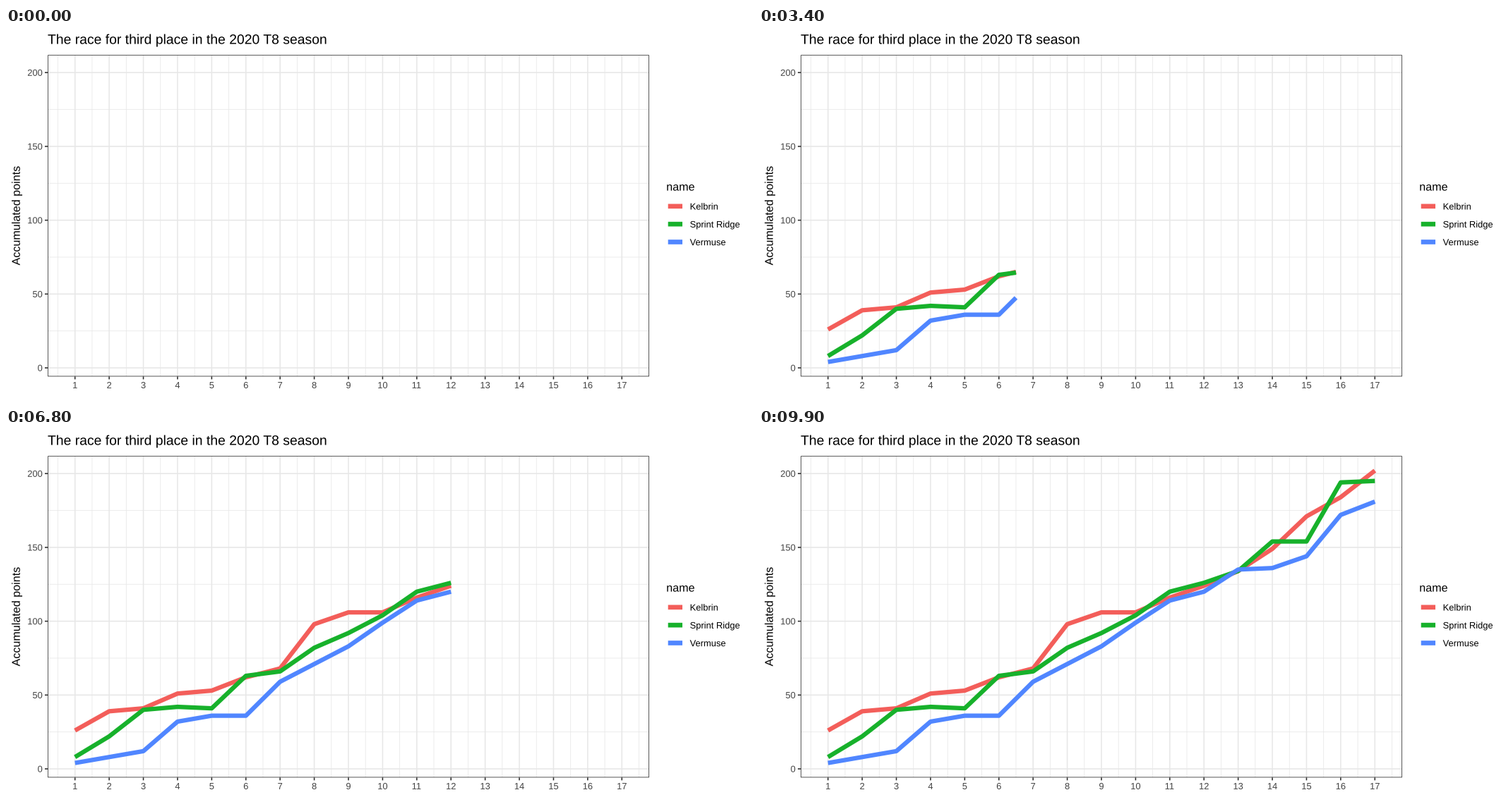
Recreate the animation shown at these times as a matplotlib script. Size 1058 px wide and 529 px high, loop 10000 ms.

```python
import numpy as np
import matplotlib.pyplot as plt
from matplotlib.animation import FuncAnimation
from matplotlib.patches import PathPatch, Rectangle
from matplotlib.textpath import TextPath
from matplotlib.transforms import Affine2D

W, H, DPI = 1058, 529, 64
FRAMES, INTERVAL = 100, 100
PT = 72 / DPI                      # points per pixel

LEFT, RIGHT, TOP, BOTTOM = 59.0, 911.0, 38.3, 494.3
STEP_X, STEP_Y = 48.41, 2.094      # pixels per race and per point
GRID, DARK, LABEL = "#e7e7e7", "#2a2a2a", "#424242"
THICK, MAJOR, MINOR = 6.26, 1.56, 0.78
SMALL, MEDIUM, LARGE = 12.9, 16.13, 19.36
DIGIT = 0.556 * SMALL              # advance of one tick-label digit

# Running total of each team after every race
TEAMS = {
    "Kelbrin": ("#f35e5a", [26, 39, 41, 51, 53, 62, 68, 98, 106, 106,
                            116, 124, 134, 149, 171, 184, 202]),
    "Sprint Ridge": ("#17b12b", [8, 22, 40, 42, 41, 63, 66, 82, 92, 104,
                                 120, 126, 134, 154, 154, 194, 195]),
    "Vermuse": ("#5086ff", [4, 8, 12, 32, 36, 36, 59, 71, 83, 99,
                            114, 120, 135, 136, 144, 172, 181]),
}
RACES = np.arange(1, 18)
TICKS = range(0, 201, 50)
# Each race is reached on a whole frame
KEYS = np.round((RACES - 1) * (FRAMES - 1) / 16)

plt.rcParams.update({"font.family": "Liberation Sans",
                     "path.simplify": False})

fig = plt.figure(figsize=(W / DPI, H / DPI), dpi=DPI, facecolor="white")
ax = fig.add_axes([0, 0, 1, 1])
ax.set_xlim(0, W)
ax.set_ylim(H, 0)
ax.axis("off")


def px(race):
    return 97.72 + (np.asarray(race) - 1) * STEP_X


def py(points):
    return 482.0 - np.asarray(points) * STEP_Y


def stroke(xs, ys, color, width, z):
    line, = ax.plot(xs, ys, color=color, lw=width * PT, zorder=z, snap=False,
                    solid_capstyle="butt", solid_joinstyle="round")
    return line


def vline(x, y0, y1, color, width, z):
    stroke([x, x], [y0, y1], color, width, z)


def hline(y, x0, x1, color, width, z):
    stroke([x0, x1], [y, y], color, width, z)


def write(x, y, text, size, color="black", angle=0, centred=False):
    """Outlined text, its baseline starting (or centred) at x, y."""
    path = TextPath((0, 0), text, size=size)
    shift = -path.get_extents().width / 2 if centred else 0
    place = (Affine2D().translate(shift, 0).scale(1, -1)
             .rotate_deg(-angle).translate(x, y))
    ax.add_patch(PathPatch(place.transform_path(path), fc=color, lw=0,
                           zorder=7, snap=False))


def draw_grid():
    for race in np.arange(0.5, 18):
        vline(px(race), TOP, BOTTOM, GRID, MINOR, 1)
    for value in range(25, 200, 50):
        hline(py(value), LEFT, RIGHT, GRID, MINOR, 1)
    for race in RACES:
        vline(px(race), TOP, BOTTOM, GRID, MAJOR, 2)
    for value in TICKS:
        hline(py(value), LEFT, RIGHT, GRID, MAJOR, 2)


def draw_axes():
    ax.add_patch(Rectangle((LEFT + MINOR / 2, TOP + MINOR / 2),
                           RIGHT - LEFT - MINOR, BOTTOM - TOP - MINOR,
                           fill=False, ec=DARK, lw=MINOR * PT,
                           zorder=6, snap=False))
    for race in RACES:
        x, text = px(race), str(race)
        vline(x, BOTTOM, BOTTOM + 4, DARK, MAJOR, 6)
        write(x - len(text) * DIGIT / 2, 510.9, text, SMALL, LABEL)
    for value in TICKS:
        y, text = py(value), str(value)
        hline(y, LEFT - 4, LEFT, DARK, MAJOR, 6)
        write(51.8 - len(text) * DIGIT, y + 4.6, text, SMALL, LABEL)
    write(19.7, 266.4, "Accumulated points", MEDIUM, angle=90, centred=True)
    write(LEFT, 22.6, "The race for third place in the 2020 T8 season", LARGE)


def draw_legend():
    write(935.2, 230.6, "name", MEDIUM)
    for i, (name, (color, _)) in enumerate(TEAMS.items()):
        y = 252.8 + i * 25.34
        hline(y, 937.7, 958.0, color, THICK + 0.4, 5)
        write(968.6, y + 4.7, name, SMALL)


draw_grid()
draw_axes()
draw_legend()
curves = [(stroke([], [], color, THICK, 3), points)
          for color, points in TEAMS.values()]


def update(frame):
    now = np.interp(frame, KEYS, RACES)
    xs = np.append(RACES[RACES < now], now) if frame else np.array([])
    for line, points in curves:
        line.set_data(px(xs), py(np.interp(xs, RACES, points)))
    return [line for line, _ in curves]


anim = FuncAnimation(fig, update, frames=FRAMES, interval=INTERVAL,
                     init_func=lambda: update(0), repeat=True,
                     repeat_delay=0, blit=False)
plt.show()
```
